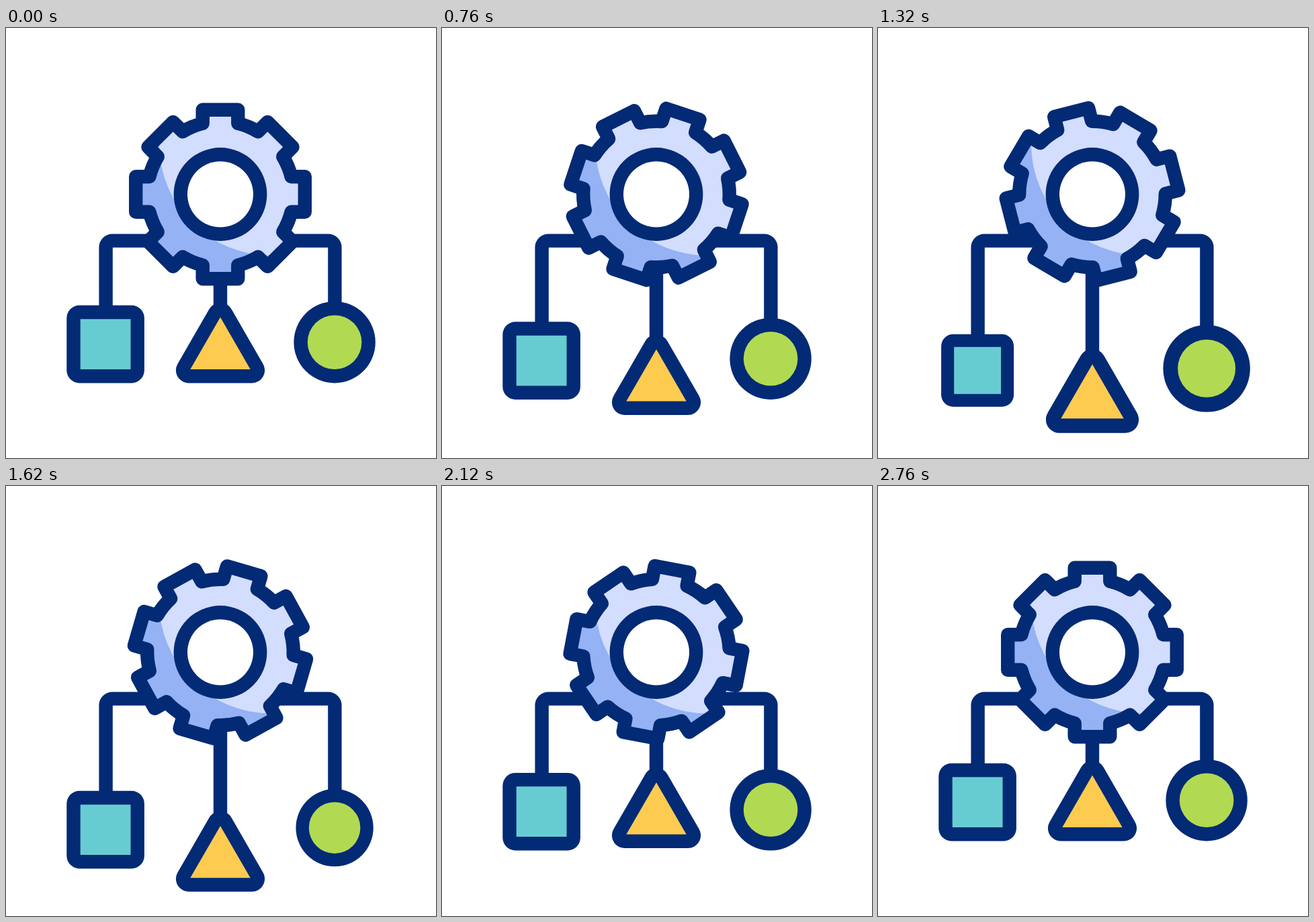
Animation of 640 by 640 pixels, one loop 3000 ms. Source, as an HTML page with a canvas:

```html
<!DOCTYPE html>
<html lang="en">
<head>
<meta charset="utf-8">
<title>Gear workflow</title>
<style>
  html, body { margin: 0; width: 100%; height: 100%; overflow: hidden; background: #fff; }
  canvas { display: block; width: 640px; height: 640px; }
</style>
</head>
<body>
<canvas id="stage" width="640" height="640"></canvas>
<script>
const ctx = document.getElementById('stage').getContext('2d');
const LOOP = 3000, TURN = 1380, LINE = 20.4;
const INK = '#032a75', LIGHT = '#d3ddfd', SHADE = '#94b2f4';
const HUB = { x: 319, y: 247.5 };

const clamp = v => Math.min(1, Math.max(0, v));
const smooth = v => { const u = clamp(v); return u * u * (3 - 2 * u); };

// Cubic Bezier easing with handles (a, 0) and (b, 1), solved by bisection
function ease(x, a, b) {
  let lo = 0, hi = 1;
  for (let i = 0; i < 30; i++) {
    const u = (lo + hi) / 2, w = 1 - u;
    if (3 * u * w * w * a + 3 * u * u * w * b + u * u * u < x) lo = u;
    else hi = u;
  }
  return smooth(lo);
}

// The gear turns clockwise, then winds back
function spin(t) {
  const x = clamp(1 - Math.abs(t - TURN) / TURN);
  return 76 * (t < TURN ? ease(x, 0.862, 0.652) : ease(x, 0.868, 0.703));
}

// Drop that settles exponentially, then a quick retract
function drop(t, depth, lag) {
  const fall = 1 - Math.exp(-Math.max(0, t - 455 - lag) / 320);
  return depth * fall * (1 - smooth((t - 1983 - lag) / 180));
}

// Swell, shrink and settle, each phase 167 ms
function pulse(t, start) {
  const p = (t - start) / 167;
  return 1 + 0.09 * (smooth(p) - 2 * smooth(p - 1) + smooth(p - 2));
}

function gearPath(angle) {
  const half = 26.3, tip = 125.8, root = 108.8;
  const lean = Math.asin(half / root), base = Math.sqrt(root * root - half * half);
  const path = new Path2D();
  for (let i = 0; i < 8; i++) {
    const a = angle + i * Math.PI / 4;
    const at = (x, y) => [
      HUB.x + x * Math.cos(a) - y * Math.sin(a),
      HUB.y + x * Math.sin(a) + y * Math.cos(a)
    ];
    for (const [x, y] of [[-half, -base], [-half, -tip], [half, -tip], [half, -base]]) {
      path.lineTo(...at(x, y));
    }
    const up = a - Math.PI / 2;
    path.arc(HUB.x, HUB.y, root, up + lean, up + Math.PI / 4 - lean);
  }
  path.closePath();
  return path;
}

function disc(x, y, r, color) {
  ctx.beginPath();
  ctx.arc(x, y, r, 0, Math.PI * 2);
  ctx.fillStyle = color;
  ctx.fill();
}

function drawGear(angle) {
  const path = gearPath(angle);
  ctx.save();
  ctx.clip(path);
  ctx.fillStyle = SHADE;
  ctx.fillRect(150, 80, 340, 340);
  disc(HUB.x + 75, HUB.y - 75, 166, LIGHT);
  ctx.restore();
  ctx.stroke(path);
  disc(HUB.x, HUB.y, 69.4, INK);
  disc(HUB.x, HUB.y, 49, '#fff');
}

function drawLinks(sideY, midY) {
  const y = 316.6;
  for (const [inner, x] of [[236, 148.6], [402, 489.4]]) {
    ctx.beginPath();
    ctx.moveTo(inner, y);
    ctx.arcTo(x, y, x, sideY, 10);
    ctx.lineTo(x, sideY);
    ctx.stroke();
  }
  ctx.beginPath();
  ctx.moveTo(HUB.x, 356);
  ctx.lineTo(HUB.x, midY);
  ctx.stroke();
}

function placed(x, y, scale, draw) {
  ctx.save();
  ctx.translate(x, y);
  ctx.scale(scale, scale);
  draw();
  ctx.restore();
}

// Regular polygon standing on a flat side
function polygon(sides, inradius, color) {
  const r = inradius / Math.cos(Math.PI / sides);
  ctx.beginPath();
  for (let i = 0; i < sides; i++) {
    const a = Math.PI / 2 + (2 * i + 1) * Math.PI / sides;
    ctx.lineTo(r * Math.cos(a), r * Math.sin(a));
  }
  ctx.closePath();
  ctx.fillStyle = color;
  ctx.fill();
}

// Sharp inside, rounded outside
function framed(sides, inradius, color) {
  const corner = 19;
  polygon(sides, inradius + LINE - corner, INK);
  ctx.lineWidth = corner * 2;
  ctx.stroke();
  polygon(sides, inradius, color);
}

function draw(t) {
  ctx.fillStyle = '#fff';
  ctx.fillRect(0, 0, 640, 640);
  ctx.strokeStyle = INK;
  ctx.lineWidth = LINE;
  ctx.lineJoin = 'round';

  const side = drop(t, 42.2, 28), mid = drop(t, 77.3, 0);
  drawLinks(440 + side, 425 + mid);
  drawGear(spin(t) * Math.PI / 180);

  placed(148.1, 470.6 + side, pulse(t, 930), () => framed(4, 37.4, '#67ccd1'));
  placed(HUB.x, 482.2 + mid, pulse(t, 1100), () => framed(3, 25.8, '#fdcb50'));
  placed(489.1, 467.7 + side, pulse(t, 1210), () => {
    disc(0, 0, 60.7, INK);
    disc(0, 0, 40.3, '#b1da52');
  });
}

const begin = performance.now();
function frame(now) {
  draw(Math.max(0, now - begin) % LOOP);
  requestAnimationFrame(frame);
}
draw(0);
requestAnimationFrame(frame);
</script>
</body>
</html>
```
